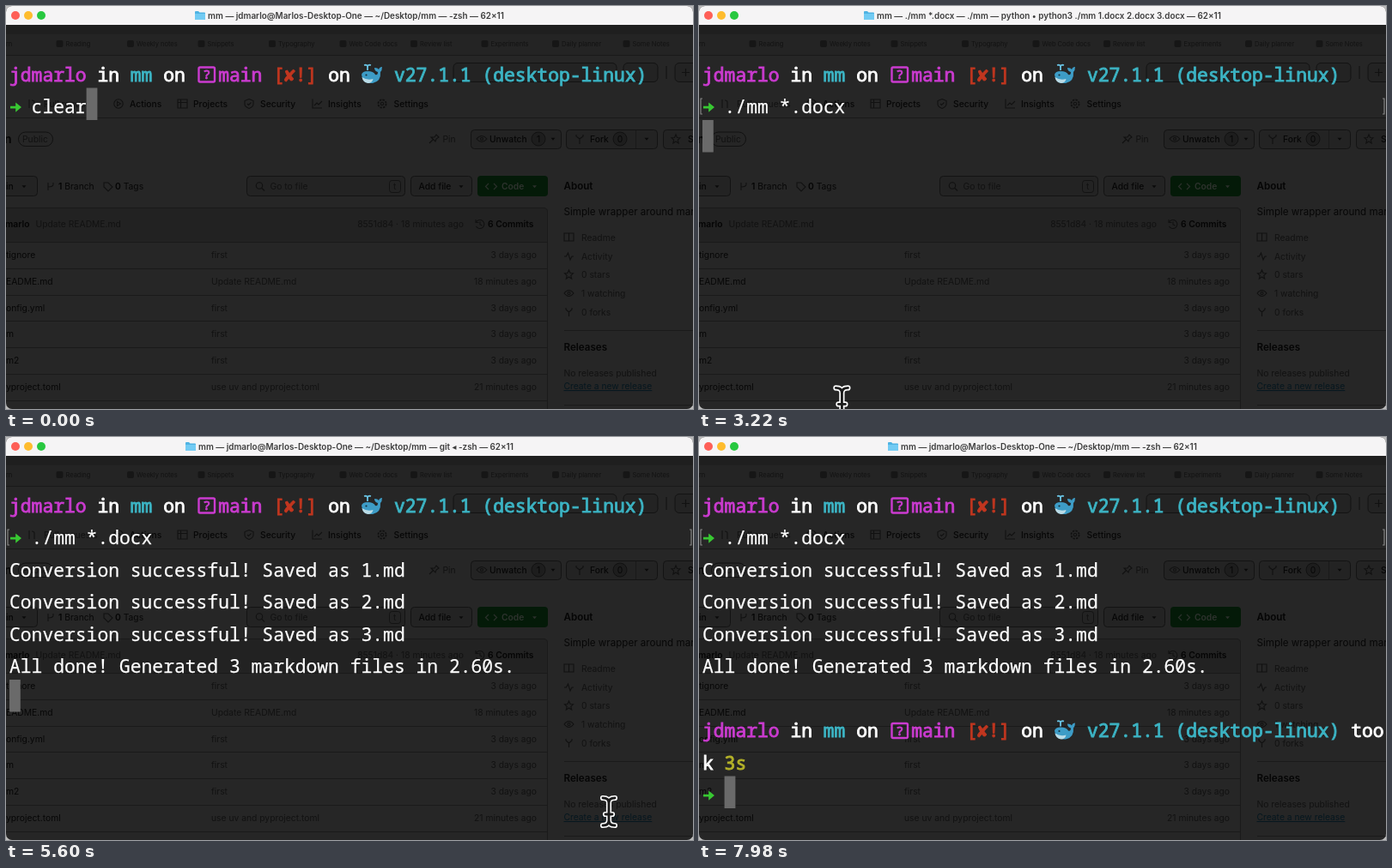
Animation of 800 by 470 pixels, one loop 8.05 s. Source, as an HTML page:

```html
<!DOCTYPE html>
<html lang="en">
<head>
<meta charset="utf-8">
<title>Terminal</title>
<style>
html, body { margin: 0; width: 100%; height: 100%; overflow: hidden; background: #bdbdbd; }
#win { position: relative; width: 800px; height: 470px; overflow: hidden; border-radius: 7px; background: #262626; }
svg { position: absolute; left: 0; top: 0; }
text { white-space: pre; }
#bar { position: absolute; left: 0; top: 0; width: 800px; height: 22px; background: #f5f4f5;
  display: flex; align-items: center; justify-content: center; gap: 3px;
  font: 600 9.9px Inter, "DejaVu Sans", sans-serif; color: #3c3c3c; white-space: pre; }
#bar svg { position: static; }
#bar i { position: absolute; top: 6px; width: 10px; height: 10px; border-radius: 50%; }
#page { font: 10.3px Inter, sans-serif; fill: #121212; }
#page .ink { fill: #070707; }
#page .b { font-weight: 600; fill: #050505; }
#page .med { font-weight: 500; fill: #070707; }
#page .h { font-size: 11.6px; }
#page .r { text-anchor: end; }
#page .tiny { font-size: 7.5px; fill: #121212; }
#page .ico { fill: none; stroke: #111; stroke-width: 1.1; }
#page .box { fill: #232323; stroke: #131313; }
#page .line { fill: none; stroke: #1a1a1a; }
#term { font: 21.333px "Noto Sans Mono", "DejaVu Sans Mono", monospace; fill: #fff; stroke: #fff; stroke-width: .25; }
#term rect, #term path { stroke-width: 0; }
.p text { stroke-width: .9; }
.mag { fill: #cb3bd0; stroke: #cb3bd0; }
.cy { fill: #3cb4c4; stroke: #3cb4c4; }
.red { fill: #c1361f; stroke: #c1361f; }
.yel { fill: #b4b229; stroke: #b4b229; }
</style>
</head>
<body>
<div id="win">
<svg width="800" height="470" viewBox="0 0 800 470">
  <defs>
    <g id="prompt" class="p">
      <text class="mag" x="4" y="87.7">jdmarlo</text>
      <text x="106.4" y="87.7">in</text>
      <text class="cy" x="144.8" y="87.7">mm</text>
      <text x="183.2" y="87.7">on</text>
      <rect x="224.5" y="71.5" width="18.5" height="17" rx="1.5" fill="none" stroke="#cb3bd0" stroke-width="2.4"/>
      <text class="mag" x="229.4" y="85.2" font-size="14.5">?</text>
      <text class="mag" x="247.2" y="87.7">main</text>
      <text class="red" x="311.2" y="87.7">[</text>
      <text class="red" x="324" y="87.7" font-family="DejaVu Sans Mono, monospace">✘</text>
      <text class="red" x="336.8" y="87.7">!]</text>
      <text x="375.2" y="87.7">on</text>
      <g stroke-width="0">
        <path d="M414 80q1-4 7-4 7 0 9 4 3 1 3-3-4-1-4-5 4 0 5 2 1-3 4-3 0 4-2 6 1 11-9 13-12 1-13-10z" fill="#3d9cc6"/>
        <path d="M414.5 83q6 4 13 2-1 5-6 5-6-1-7-7z" fill="#b9dbe6"/>
        <circle cx="419.5" cy="80.5" r="1.1" fill="#16303c"/>
      </g>
      <path d="M421 75v-4q0-3-4-2M421 71q0-3 4-2" fill="none" stroke="#69c3e4" stroke-width="1.8"/>
      <text class="cy" x="452" y="87.7">v27.1.1 (desktop-linux)</text>
    </g>
    <path id="arrow" d="M5 116.7h6.2v-4.2l6.8 5.6-6.8 5.6v-4.2H5z" fill="#38c832" stroke="none"/>
    <path id="beam" d="M-7-16q7 0 7 6V10q0 6-7 6M7-16q-7 0-7 6V10q0 6 7 6M-4 3H4" fill="none" stroke-linecap="round"/>
    <path id="caret" d="M-2.5-1.2h5L0 1.7z" fill="#0a0a0a"/>
    <path id="star" d="M0-5l1.5 3.5 3.5.3-2.7 2.5.9 3.7-3.2-2-3.2 2 .9-3.7-2.7-2.5 3.5-.3z"/>
  </defs>

  <g id="page">
    <rect y="22" width="800" height="11" fill="#1f1f1f"/>
    <rect y="33" width="800" height="25" fill="#242424"/>
    <path class="line" d="M0 57.5H800M0 130.5H800M650 378.5H800M650 465.5H800"/>
    <g id="marks"></g>
    <rect class="box" x="521" y="66.5" width="190" height="22" rx="5"/>
    <rect class="box" x="719" y="66.5" width="40" height="22" rx="5"/>
    <rect class="box" x="779" y="66.5" width="40" height="22" rx="5"/>
    <path class="ico" d="M769 70v15M787 77.5h9M791.5 73v9"/>

    <g class="ico">
      <circle cx="131" cy="114" r="5.2"/><path d="M129.5 111.5l4 2.5-4 2.5z"/>
      <path d="M200 109h11v10h-11zM200 112.5h11M203.5 109v10"/>
      <path d="M283 108.5l5 2v4q0 3-5 5-5-2-5-5v-4zM281 114l1.5 1.5 3-3"/>
      <path d="M357 108.5v10.5h11M359 116l3-3 2 2 4-4"/>
      <circle cx="438" cy="114" r="4.6" stroke-width="1.8" stroke-dasharray="2.4 1.2"/><circle cx="438" cy="114" r="1.7"/>
      <path d="M27 109v10M33 119v-7q0-2-3-2"/>
    </g>
    <text x="44" y="117.7">Pull requests</text>
    <g class="med">
      <text x="144" y="117.7">Actions</text><text x="218" y="117.7">Projects</text>
      <text x="296" y="117.7">Security</text><text x="375" y="117.7">Insights</text>
      <text x="451.5" y="117.7">Settings</text>
    </g>

    <text class="b" x="-2" y="160" font-size="14">n</text>
    <rect x="14.5" y="147" width="40" height="16.5" rx="8.2" fill="none" stroke="#111"/>
    <text x="19" y="158.8">Public</text>
    <path class="ico" d="M493 160l4-4m-2-3l5 5 1-3 3-2-3-3-2 3z"/>
    <text x="508.5" y="158.8">Pin</text>
    <rect class="box" x="541.5" y="144.5" width="105" height="22" rx="4"/>
    <path class="ico" d="M548 155q6-7 12 0-6 7-12 0z"/><circle class="ico" cx="554" cy="155" r="1.5"/>
    <text class="med" x="563" y="158.8">Unwatch</text>
    <circle cx="620" cy="155" r="8" fill="#1d1d1d" stroke="#121212"/>
    <text class="ink" x="618" y="158.7">1</text><use href="#caret" x="637" y="155"/>
    <rect class="box" x="652.5" y="144.5" width="106" height="22" rx="4"/><path class="line" d="M733.5 145v21"/>
    <path class="ico" d="M664 150v2l4 3 4-3v-2M668 155v6"/>
    <text class="med" x="680" y="158.8">Fork</text>
    <circle cx="715" cy="155" r="8" fill="#1d1d1d" stroke="#121212"/>
    <text class="ink" x="711.8" y="158.7">0</text><use href="#caret" x="746" y="155"/>
    <rect class="box" x="765.5" y="144.5" width="50" height="22" rx="4"/>
    <use class="ico" href="#star" x="780" y="155"/><text class="med" x="794" y="158.8">Star</text>

    <rect class="box" x="-20" y="198.5" width="56.5" height="23" rx="4"/>
    <text class="med" x="0" y="213.8">in</text><use href="#caret" x="21" y="210.5"/>
    <path class="ico" d="M49 206v9M55 206v2q0 3-6 3"/><text class="ink" x="61" y="213.8"><tspan class="b">1</tspan> Branch</text>
    <path class="ico" d="M114 206h5l5 5-5 5-5-5z"/><text class="ink" x="127" y="213.8"><tspan class="b">0</tspan> Tags</text>
    <rect class="box" x="280.5" y="198.5" width="184" height="23" rx="4"/>
    <circle class="ico" cx="295" cy="209.5" r="3.7"/><path class="ico" d="M298 212.5l3 3"/>
    <text x="307.5" y="213.8">Go to file</text>
    <rect class="box" x="446.5" y="203.5" width="13" height="14" rx="3"/><text x="451" y="213.8">t</text>
    <rect class="box" x="471.5" y="198.5" width="71" height="23" rx="4"/>
    <text class="med" x="480.5" y="213.8">Add file</text><use href="#caret" x="530" y="210.5"/>
    <rect x="549" y="198" width="82" height="24" rx="4" fill="#041a08"/>
    <path d="M562 207l-3.5 3.5 3.5 3.5M568 207l3.5 3.5-3.5 3.5" fill="none" stroke="#2b302b" stroke-width="1.2"/>
    <text x="577" y="214" font-weight="600" fill="#2e332e">Code</text><path d="M613 209.3h5l-2.5 2.9z" fill="#2b302b"/>

    <path d="M-5 235.5H626q4.5 0 4.5 4.5V275.5H-5z" fill="#222"/>
    <path class="line" d="M-5 235.5H626q4.5 0 4.5 4.5V480"/>
    <text class="b" x="-1" y="258.2">marlo</text>
    <text x="34.5" y="258.2">Update README.md</text>
    <text class="r" x="533" y="258.2">8551d84 · 18 minutes ago</text>
    <path class="ico" d="M547.5 252a5 5 0 1 1 0 5M547 249v3.5h3.5M552 251.5v3.5l2.5 1"/>
    <text class="b" x="561" y="258.2">6 Commits</text>
    <g id="files"></g>

    <text class="b h" x="649.5" y="214.2">About</text>
    <text class="ink h" x="649.5" y="244.2">Simple wrapper around markdown</text>
    <g class="ico">
      <path d="M650 265h5.5v9H650zM655.5 265h5.5v9h-5.5z"/>
      <path d="M650 292h2.5l2-4 2.5 8 2-4h2"/>
      <use href="#star" x="655.5" y="313"/>
      <path d="M650 335q5.5-7 11 0-5.5 7-11 0z"/><circle cx="655.5" cy="335" r="1.5"/>
      <path d="M652 352v2l3.5 3 3.5-3v-2M655.5 357v5"/>
    </g>
    <text x="670" y="273.7">Readme</text><text x="670" y="295.7">Activity</text>
    <text x="670" y="317">0 stars</text><text x="670" y="338.7">1 watching</text><text x="670" y="360.7">0 forks</text>
    <text class="b h" x="649.5" y="402.4">Releases</text>
    <text x="649.5" y="431.7">No releases published</text>
    <text x="649.5" y="447" fill="#06171f" text-decoration="underline">Create a new release</text>
  </g>

  <g id="term">
    <rect id="block" width="12.8" height="37.5" fill="#6a6a6a"/>
    <g data-show="0 210 420 8050"><use href="#prompt"/><use href="#arrow"/></g>
    <text id="cmd" x="29.6" y="125.2"></text>
    <path data-show="2310 8050" d="M4 108H2v18h2M796 108h2v18h-2" fill="none" style="stroke:#858585;stroke-width:1.2"/>
    <text data-show="3640 8050" x="4" y="162.7">Conversion successful! Saved as 1.md</text>
    <text data-show="4500 8050" x="4" y="200.2">Conversion successful! Saved as 2.md</text>
    <text data-show="5300 8050" x="4" y="237.7">Conversion successful! Saved as 3.md</text>
    <text data-show="5370 8050" x="4" y="275.2">All done! Generated 3 markdown files in 2.60s.</text>
    <g data-show="5740 8050">
      <use href="#prompt" y="262.5"/>
      <g class="p">
        <text x="759.2" y="350.2">too</text>
        <text x="4" y="387.7">k <tspan class="yel">3s</tspan></text>
      </g>
      <use href="#arrow" y="300"/>
    </g>
  </g>

  <g id="pointer">
    <use href="#beam" stroke="#fff" stroke-width="6.2"/>
    <use href="#beam" stroke="#1c1c1c" stroke-width="2.9"/>
  </g>
</svg>

<div id="bar">
  <i style="left:6px;background:#fe5f57"></i><i style="left:21px;background:#febc2e"></i><i style="left:36px;background:#28c840"></i>
  <svg width="12" height="10" viewBox="0 0 12 10"><path d="M0 1q0-1 1-1h3l1.5 1.5H11q1 0 1 1V9q0 1-1 1H1q-1 0-1-1z" fill="#4fb3e3"/><path d="M0 3h12v6q0 1-1 1H1q-1 0-1-1z" fill="#72cbf3"/></svg>
  <span id="title"></span>
</div>
</div>

<script>
const LOOP = 8050;
const $ = id => document.getElementById(id);

// Repeated parts of the page behind the terminal
const files = [
  ["tignore", "first", "3 days ago"],
  ["EADME.md", "Update README.md", "18 minutes ago"],
  ["onfig.yml", "first", "3 days ago"],
  ["m", "first", "3 days ago"],
  ["m2", "first", "3 days ago"],
  ["yproject.toml", "use uv and pyproject.toml", "21 minutes ago"]
];
$("files").innerHTML = files.map(([name, note, age], i) => {
  const y = 294 + i * 30.8;
  return `<path class="line" d="M0 ${Math.round(275 + i * 30.8) + 0.5}H630"/>
    <text class="ink" x="0" y="${y}">${name}</text>
    <text x="239" y="${y}">${note}</text><text class="r" x="618" y="${y}">${age}</text>`;
}).join("") + '<path class="line" d="M0 460.5H630"/>';

const marks = ["Learn", "Reading", "Weekly notes", "Snippets", "Typography", "Web Code docs", "Review list", "Experiments", "Daily planner", "Some Notes"];
$("marks").innerHTML = marks.map((m, i) => {
  const x = 82.5 * i - 24;
  return `<rect x="${x}" y="40" width="8" height="8" rx="2" fill="#161616"/><text class="tiny" x="${x + 11}" y="46.7">${m}</text>`;
}).join("");

const command = "./mm *.docx";
const home = "mm — jdmarlo@Marlos-Desktop-One — ~/Desktop/mm — ";
const run = "mm — ./mm *.docx — ./mm — ";
const titles = [
  [0, home + "-zsh — 62×11"],
  [2310, run + "-zsh — 62×11"],
  [2520, run + "python • python3 ./mm 1.docx 2.docx 3.docx — 62×11"],
  [5390, home + "git ◂ -zsh — 62×11"],
  [5740, home + "-zsh — 62×11"]
];
// time, row, column of the block cursor
const blocks = [
  [0, 2, 7], [210, 0, 0], [420, 2, 2], [2310, 3, 0], [3640, 4, 0],
  [4500, 5, 0], [5300, 6, 0], [5370, 7, 0], [5740, 10, 2]
];
// time, x, y of the mouse pointer
const path = [
  [0, 166, 495], [3150, 166, 495], [3450, 169, 257.5], [5000, 169, 257.5],
  [5390, 702, 437], [6440, 702, 437], [6790, 625, 479], [6900, 610, 500], [LOOP, 610, 500]
];

const shown = [...document.querySelectorAll("[data-show]")].map(el => [el, el.dataset.show.split(" ").map(Number)]);
const at = (list, t) => list.filter(s => s[0] <= t).pop();

function pointerAt(t) {
  const i = path.findIndex(p => p[0] > t);
  const [t0, x0, y0] = path[i - 1], [t1, x1, y1] = path[i];
  const u = (t - t0) / (t1 - t0), k = u * u * (3 - 2 * u);
  return [x0 + (x1 - x0) * k, y0 + (y1 - y0) * k];
}

function setText(el, s) {
  if (el.textContent !== s) el.textContent = s;
}

function draw(t) {
  for (const [el, times] of shown) {
    const on = times.filter(s => s <= t).length % 2;
    el.style.visibility = on ? "visible" : "hidden";
  }
  const typed = Math.max(0, Math.min(command.length, Math.floor((t - 770) / 80) + 1));
  setText($("cmd"), t < 210 ? "clear" : command.slice(0, typed));
  setText($("title"), at(titles, t)[1]);

  let [, row, col] = at(blocks, t);
  if (t >= 420 && t < 2310) col += typed;
  $("block").setAttribute("x", 4 + col * 12.8);
  $("block").setAttribute("y", 20.5 + row * 37.5);
  $("pointer").setAttribute("transform", `translate(${pointerAt(t)})`);
}

const start = performance.now();
function tick(now) {
  draw(Math.max(0, now - start) % LOOP);
  requestAnimationFrame(tick);
}
draw(0);
requestAnimationFrame(tick);
</script>
</body>
</html>
```
